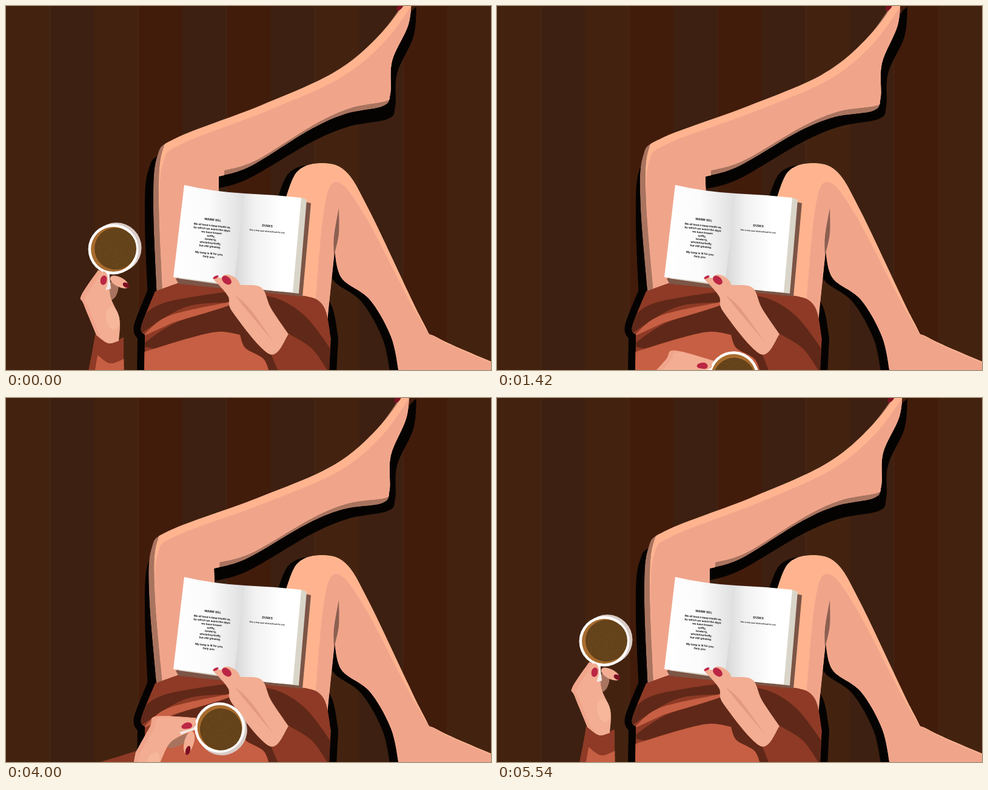
Animation of 800x600 px, one loop 6020 ms. Source, as an HTML page:

```html
<!DOCTYPE html>
<html lang="en">
<head>
<meta charset="utf-8">
<title>Reading with coffee</title>
<style>
  html, body { margin: 0; width: 100%; height: 100%; overflow: hidden; background: #40210f; }
  svg { display: block; width: 100vw; height: 100vh; }
  text { font-family: Inter, "Open Sans", sans-serif; font-weight: 700; text-anchor: middle; fill: #111; }
</style>
</head>
<body>
<svg id="stage" viewBox="0 0 800 600">
  <defs id="defs">
    <linearGradient id="leftPage">
      <stop offset="0" stop-color="#fff"/><stop offset=".5" stop-color="#fbfbfb"/><stop offset="1" stop-color="#dedede"/>
    </linearGradient>
    <linearGradient id="rightPage">
      <stop offset="0" stop-color="#d6d6d6"/><stop offset=".3" stop-color="#f1f1f1"/><stop offset=".7" stop-color="#fff"/>
    </linearGradient>
  </defs>
  <g id="scene"></g>
  <g id="book">
    <path fill="#7c5546" d="M490 322L503 325L489 479L285 458L280 450Z"/>
    <path fill="#d9d5c9" d="M284 449L376 462L483 474L496 319L487 316Z"/>
    <path fill="url(#leftPage)" d="M294 295Q340 306 394 309L378 460Q330 453 276 447Z"/>
    <path fill="url(#rightPage)" d="M393 309Q440 311 487 316L473 472Q425 470 376 459Z"/>
  </g>
  <g id="front"></g>
  <g id="cup">
    <path fill="#f1e9e6" d="M-22 34L-9 38L-6 66L-14 68Z"/>
    <circle cx="3" cy="-1.5" r="41.5" fill="#d9cbc6"/>
    <circle cx="-2" cy="1" r="41.5" fill="#fff"/>
    <circle cx="-2" cy="1" r="37" fill="#a96c2e"/>
    <circle cx="1.5" r="34.5" fill="#64421a"/>
  </g>
  <g id="fingers"></g>
</svg>
<script>
const $ = id => document.getElementById(id);
const scene = $('scene'), front = $('front'), fingers = $('fingers');
const skin = '#f0a58b', pale = '#f2ad92', glow = '#ffb48f', shade = '#a9745f', black = '#050302';
const rust = '#8e3a26', dark = '#602818', coral = '#c65f43', red = '#bb2644', wine = '#7c1022';

function add(parent, tag, attrs, text) {
  const el = document.createElementNS('http://www.w3.org/2000/svg', tag);
  for (const k in attrs) el.setAttribute(k, attrs[k]);
  if (text) el.textContent = text;
  return parent.appendChild(el);
}

// Smooth outline through points; "|" marks a sharp corner.
function curve(spec, warp = p => p) {
  let d = '', last;
  for (const part of spec.split('|')) {
    const pts = part.trim().split(/\s+/).map(s => warp(s.split(',').map(Number)));
    if (last) pts.unshift(last); else d = `M${pts[0]}`;
    for (let i = 1; i < pts.length; i++) {
      const b = pts[i - 1], c = pts[i], a = pts[i - 2] || b, e = pts[i + 1] || c;
      d += `C${b.map((v, k) => v + (c[k] - a[k]) / 6)} ${c.map((v, k) => v - (e[k] - b[k]) / 6)} ${c}`;
    }
    last = pts[pts.length - 1];
  }
  return d + 'Z';
}

function oval(x, y, rx, ry, tilt) {
  const a = tilt * Math.PI / 180;
  return Array.from({ length: 13 }, (_, i) => {
    const u = rx * Math.cos(i * Math.PI / 6), v = ry * Math.sin(i * Math.PI / 6);
    return [x + u * Math.cos(a) - v * Math.sin(a), y + u * Math.sin(a) + v * Math.cos(a)];
  }).join(' ');
}

// One outline painted in shifted tones, each kept inside the one before.
let count = 0;
function shape(parent, spec, ...tones) {
  const id = 'shape' + count++;
  const el = add($('defs'), 'path', { id, d: curve(spec) });
  add(add($('defs'), 'clipPath', { id: id + 'clip' }), 'use', { href: '#' + id });
  let inner = parent;
  for (const [fill, dx = 0, dy = 0] of tones) {
    inner = add(inner, 'g', { transform: `translate(${dx} ${dy})`, 'clip-path': `url(#${id}clip)` });
    add(inner, 'use', { href: '#' + id, fill });
  }
  return { inner, bend: warp => el.setAttribute('d', curve(spec, warp)) };
}
const paint = (parent, fill, spec, warp) => add(parent, 'path', { fill, d: curve(spec, warp) });

const boards = { a: '#432310', b: '#3d2011', r: '#421c0b' };
[...'abarbrbabra'].forEach((tone, i) => {
  add(scene, 'rect', { x: i * 72.73, width: 73.5, height: 600, fill: boards[tone] });
  if (i % 2) add(scene, 'rect', { x: i * 72.73 - .5, width: 1, height: 600, fill: '#57341f', opacity: .5 });
});

const raisedLeg = '662,-14 612,52 540,110 420,164 280,218 249,249 243,330 249,480|340,480|351,300|351,281|404,264 500,205 560,178 622,165 634,144 637,90 664,30 669,-20';
const bentLeg = '460,320 480,273 517,259 560,272 601,340 687,519 711,546 805,588|805,605|648,605|635,545 600,484 554,449 542,405|530,520|470,520';
const skirt = '246,470 285,456|340,462|475,475 522,492 536,548|533,605|228,605|229,542|223,528 246,470';

// Shadows
add(scene, 'path', { d: curve(skirt), stroke: black, 'stroke-width': 24, 'stroke-linejoin': 'round' });
paint(scene, black, raisedLeg, ([x, y]) => [x - 14 + 22 * Math.min(1, Math.max(0, (x - 250) / 370)), y + 21]);
paint(scene, black, bentLeg, ([x, y]) => [x - 14, y + 3]);

const bent = shape(scene, bentLeg, [glow]);
paint(bent.inner, skin, '508,520 524,340 545,290 590,342 678,508 712,548 810,592|810,610|530,610');
paint(scene, '#8c6051', '549,333 549,375 541,412|541,380 549,333');

const leg = shape(scene, raisedLeg, [shade], [glow, 9, -10], [skin, 1, 19]);
const toenail = shape(scene, oval(650, 1, 8, 4, -50), [wine]);

const cloth = shape(scene, skirt, [rust]).inner;
paint(cloth, dark, '222,515 265,488 400,466|400,486 300,495 222,540');
paint(cloth, dark, '222,560 280,522 370,492|430,478 490,508 540,572|540,610|440,610');
paint(cloth, coral, '225,545 268,511 368,488|364,495 275,522');
paint(cloth, coral, '222,572 300,548 350,537 386,542|395,564 425,582 436,610|222,610');

function lines(x, y, angle, rows) {
  const g = add($('book'), 'g', { transform: `translate(${x} ${y}) rotate(${angle})` });
  rows.forEach(([dy, size, str]) => add(g, 'text', { y: dy, 'font-size': size }, str));
}
lines(341, 354, 6, [
  [0, 5, 'WARM SILL'],
  ...['We all tend a lamp inside us,', 'by which we warm the days', 'we have known', 'softly,',
    'tenderly,', 'wholeheartedly,', 'but still glowing.', '', 'My lamp is lit for you.', 'Only you.']
    .map((s, i) => [9.5 + i * 5.75, 4.5, s])
]);
lines(431, 364, 5, [[0, 5, 'DUSKS'], [8.5, 3.2, 'This is how your dusk will wait for you']]);

// Hand on the book
paint(front, rust, '466,540 505,565 533,605|450,605|437,573');
paint(front, pale, '341,449 354,448 384,459 421,464 437,498 466,541|435,574 374,505 366,478 341,449');
paint(front, pale, oval(371, 454, 16, 9, 30));
paint(front, '#e39a80', '376,475 402,499 441,553|400,505 376,475');
paint(front, red, oval(364, 452, 9, 6, 40));
paint(front, red, oval(346, 447, 5, 2, -25));

// Arm with the cup
const arm = [
  shape(front, '147,541 168,555 194,546|196,720|112,720|142,570', [rust], [coral, 4, 34]),
  shape(front, oval(176, 468, 9, 17, 15), [shade]),
  shape(front, '152,435 124,477 128,492 149,543|168,556 186,552|187,515 172,478 171,442', [skin], [pale, 7, 3]),
  shape(front, oval(176, 515, 11, 19, -10), ['#f6b79b']),
  shape(front, oval(187, 455, 17, 8, 28), [pale]),
  shape(fingers, oval(159, 455, 9, 18, 8), [pale]),
  shape(fingers, oval(161, 452, 5.5, 8, 12), [red]),
  shape(fingers, oval(198, 460, 6, 4, 30), [wine])
];

// Foam specks on the coffee
let seed = 7;
const random = () => (seed = seed * 16807 % 2147483647) / 2147483647;
for (let i = 0; i < 130; i++) {
  const r = 33 * Math.sqrt(random()), a = random() * 2 * Math.PI;
  add($('cup'), 'circle', { cx: 1.5 + r * Math.cos(a), cy: r * Math.sin(a), r: .5, fill: '#92703a', opacity: .55 });
}

const LOOP = 6020, MOVE = 5540, CUP_PEAK = 2580;
const clamp = v => Math.min(1, Math.max(0, v));

// The knee drifts left while the heel sinks; hip and toes hardly move.
const legWarp = sway => ([x, y]) => {
  const along = clamp((x - 300) / 330), heel = along * clamp(y / 160);
  return [
    x + sway * clamp((460 - y) / 180) * (4 * heel - 14 * (1 - .6 * along)),
    y + sway * 13 * along * heel
  ];
};

// The wrist turns less than the cup, so the twist fades with distance.
const armWarp = (cx, cy, turn) => ([x, y]) => {
  const dx = x - 179, dy = y - 400, d = Math.hypot(dx, dy);
  const angle = Math.atan2(dy, dx) + turn * (1 - .18 * clamp((d - 55) / 50)) * Math.PI / 180;
  const r = d * (1 + .15 * clamp(turn / 37) * clamp(1 - Math.abs(d - 95) / 40));
  return [cx + r * Math.cos(angle), cy + r * Math.sin(angle)];
};

function frame() {
  const t = Math.min((performance.now() - start) % LOOP, MOVE);

  const u = 1 - Math.abs(1 - 2 * t / MOVE);
  const bendLeg = legWarp((u + Math.sin(u * Math.PI / 2)) / 2);
  leg.bend(bendLeg);
  toenail.bend(bendLeg);

  const swing = Math.max(0, Math.sin(t / CUP_PEAK * Math.PI / 2));
  const turn = 128 * swing ** 1.2;
  const cx = 179 + 2.3 * turn, cy = 400 + .025 * turn * turn;
  const bendArm = armWarp(cx, cy, turn);
  arm.forEach(part => part.bend(bendArm));
  $('cup').setAttribute('transform', `translate(${cx} ${cy}) rotate(${turn})`);

  requestAnimationFrame(frame);
}
const start = performance.now();
frame();
</script>
</body>
</html>
```
